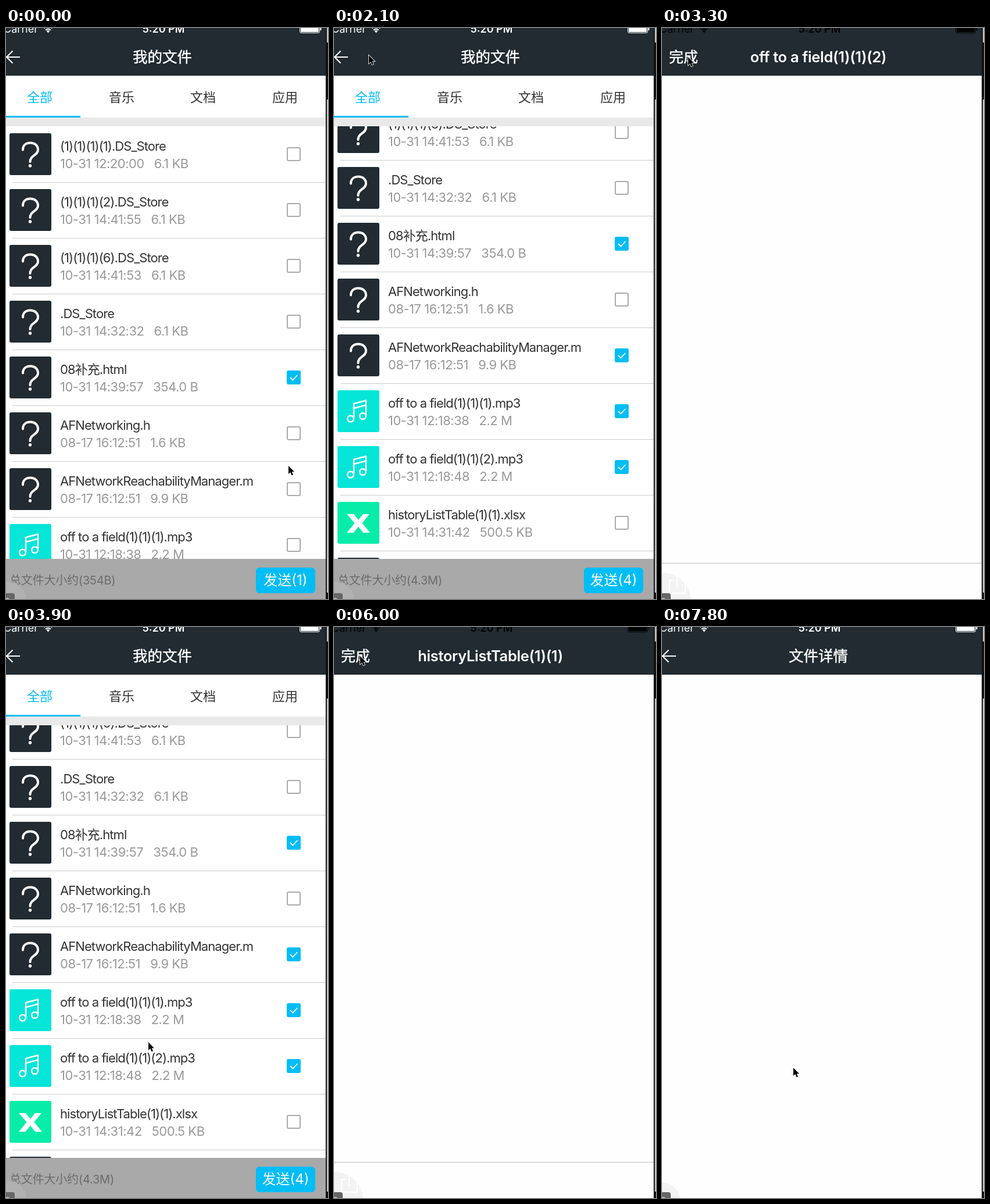
Write an HTML page that moves like this. It is 554 by 982 pixels and loops after 8 s.

```html
<!DOCTYPE html>
<html lang="zh-CN">
<head>
<meta charset="utf-8">
<title>我的文件</title>
<style>
  html, body { margin: 0; width: 100%; height: 100%; overflow: hidden; background: #fefefe; }
  body { position: relative; font-family: Inter, "Noto Sans CJK SC", "Noto Sans CJK", sans-serif; color: #333; }
  div, span, svg { position: absolute; left: 0; top: 0; }
  span { white-space: pre; }
  #stage { width: 554px; height: 982px; overflow: hidden; background: #fefefe; }
  [hidden] { display: none; }
  .mid { transform: translateX(-50%); }

  #bar { width: 550px; height: 82px; background: #212b31; color: #fff; }
  #status { width: 550px; height: 12px; color: #fff; }
  #status.dark { color: #000; }
  #status span { top: -9px; font-size: 18px; line-height: 22px; }
  #status .carrier { left: auto; right: 495px; }
  #status .clock { left: 271px; font-weight: 600; }
  .head { top: 34px; left: 269px; font-size: 25.5px; line-height: 32px; font-weight: 600; letter-spacing: -.013em; }
  .head.cjk, #done { font-weight: 500; letter-spacing: 0; -webkit-text-stroke: .5px #fff; }
  #done { left: 12px; top: 34px; font-size: 25px; line-height: 32px; }
  #back { top: 36px; }

  #list { top: 82px; width: 550px; height: 900px; background: #fff; }
  .tab { top: 22px; font-size: 22px; line-height: 30px; }
  .tab.on { color: #00bdf5; }
  #line { top: 69px; width: 128px; height: 3px; background: #00bdf5; z-index: 1; }
  #strip { top: 72px; width: 550px; height: 15px; background: #e9e9e9; }
  #view { top: 87px; width: 550px; height: 744px; overflow: hidden; }
  .row { width: 550px; height: 96px; }
  .row::after { content: ""; position: absolute; left: 11px; right: 0; top: 96px; height: 1px; background: #ccc; }
  .icon { left: 6px; top: 12px; width: 72px; height: 72px; border-radius: 3px; }
  .name, .info { left: 93px; font-size: 22px; line-height: 30px; }
  .name { top: 19px; letter-spacing: -.042em; }
  .info { top: 49px; letter-spacing: -.022em; color: #999; }
  .box { left: 483px; top: 36px; width: 24px; height: 24px; box-sizing: border-box;
         border: 2px solid #aaa; border-radius: 3px; background: #fff; }
  .box svg { left: -2px; top: -2px; visibility: hidden; }
  .box.on { border-color: #00bdf5; background: #00bdf5; }
  .box.on svg { visibility: visible; }

  #foot { top: 831px; width: 550px; height: 69px; background: #a9a9a9; }
  #total { left: 6px; top: 22px; font-size: 20px; line-height: 30px; color: #6b6b6b; letter-spacing: -.01em; }
  #send { left: 430px; top: 15px; width: 102px; height: 44px; border-radius: 6px; background: #00bdf5;
          color: #fff; font-size: 24px; line-height: 44px; text-align: center; }

  #tool { top: 920px; width: 550px; height: 61px; border-top: 1px solid #b9b9b9; }
  #halo { border-radius: 50%; transform: translate(-50%, -50%); left: 2px; top: 985px; }
  #knob { left: -8px; top: 972px; width: 23px; height: 20px; border-radius: 4px; background: #666; }
  #knob::after { content: ""; position: absolute; left: 7px; top: 8px; width: 7px; height: 7px; border-radius: 50%; background: #bbb; }
  #edge { left: 550px; width: 4px; height: 982px; background: linear-gradient(90deg, #161616 1.5px, #c4c4c4 2px); }
  #edge::before, #edge::after { content: ""; position: absolute; left: 1px; right: 0; background: #111; }
  #edge::before { top: 25px; height: 98px; }
  #edge::after { top: 971px; height: 11px; }
</style>
</head>
<body>
<div id="stage">
  <div id="list">
    <span class="tab mid on" style="left:58px">全部</span>
    <span class="tab mid" style="left:199px">音乐</span>
    <span class="tab mid" style="left:339px">文档</span>
    <span class="tab mid" style="left:480px">应用</span>
    <div id="line"></div>
    <div id="strip"></div>
    <div id="view"><div id="rows"></div></div>
    <div id="foot"><span id="total"></span><div id="send"></div></div>
  </div>
  <div id="tool"></div>
  <div id="halo"></div>
  <svg id="share" width="50" height="982" fill="none" stroke="#fff" stroke-width="2">
    <path d="M20 950H13V972H40V950H33M26 963V942"/>
  </svg>
  <div id="knob"></div>

  <div id="bar">
    <div id="status">
      <span class="carrier">Carrier</span>
      <span class="clock mid">5:20 PM</span>
      <svg width="550" height="12" fill="none" stroke="currentColor">
        <path d="M65.500 0.500Q72.500 -5.500 79.500 0.500M68 3.500Q72.500 0 77 3.500" stroke-width="2"/>
        <path d="M69.500 5L72.500 8.500L75.500 5Q72.500 3 69.500 5Z" fill="currentColor" stroke="none"/>
        <rect x="505.500" y="-8" width="34" height="16.500" rx="2.500"/>
        <rect x="507" y="-6" width="31" height="13" rx="1" fill="currentColor" stroke="none"/>
        <path d="M541.500 -3V4" stroke-width="2"/>
      </svg>
    </div>
    <svg id="back" width="26" height="28" fill="none" stroke="#fff" stroke-width="2">
      <path d="M24 14H1M11.500 3.500L1 14L11.500 24.500"/>
    </svg>
    <span id="done">完成</span>
    <span id="head" class="head mid"></span>
  </div>
  <div id="edge"></div>
  <svg id="cursor" width="16" height="22" viewBox="-2 -2 16 22">
    <path d="M0 0V14L3.200 11L5.500 16.300L8 15.200L5.700 10.200H10Z" stroke="#fff" stroke-width="1.600" paint-order="stroke"/>
  </svg>
</div>
<script>
const $ = id => document.getElementById(id);
const LOOP = 8000, STEP = 300;

const ICONS = {
  ask: ['#212b31', '<path d="M23 28.500C23 20.500 28.500 16.500 36 16.500S49 21 49 28.500C49 38 35.500 38 35.500 49" stroke-width="4" stroke-linecap="round"/><circle cx="35.500" cy="56" r="2.700" fill="#fff" stroke="none"/>'],
  song: ['#05e5d8', '<path d="M28 49V23L49 17.500V44M28 31L49 25.500" stroke-width="2.600" stroke-linejoin="round"/><circle cx="22.500" cy="49" r="5.300" stroke-width="2.600"/><circle cx="43.500" cy="44.500" r="5.300" stroke-width="2.600"/>'],
  sheet: ['#07eca8', '<path d="M16 21H28L36 31L44 21H55L42.500 36.500L56 53H44L36 42.500L27.500 53H16L29.500 36.500Z" fill="#fff" stroke="none"/>']
};

const FILES = [
  ['ask', '(1)(1)(1)(1).DS_Store', '10-31 12:20:00   6.1 KB'],
  ['ask', '(1)(1)(1)(2).DS_Store', '10-31 14:41:55   6.1 KB'],
  ['ask', '(1)(1)(1)(6).DS_Store', '10-31 14:41:53   6.1 KB'],
  ['ask', '.DS_Store', '10-31 14:32:32   6.1 KB'],
  ['ask', '08补充.html', '10-31 14:39:57   354.0 B'],
  ['ask', 'AFNetworking.h', '08-17 16:12:51   1.6 KB'],
  ['ask', 'AFNetworkReachabilityManager.m', '08-17 16:12:51   9.9 KB'],
  ['song', 'off to a field(1)(1)(1).mp3', '10-31 12:18:38   2.2 M'],
  ['song', 'off to a field(1)(1)(2).mp3', '10-31 12:18:48   2.2 M'],
  ['sheet', 'historyListTable(1)(1).xlsx', '10-31 14:31:42   500.5 KB'],
  ['ask', 'LICENSE', '08-17 16:12:52   1.1 KB'],
  ['ask', 'README(1).md', '10-31 14:51:39   14.3 KB'],
  ['ask', '', '']
];

$('rows').innerHTML = FILES.map(([kind, name, info], i) => {
  const [color, art] = ICONS[kind];
  return `<div class="row" style="top:${i * 96}px">
    <svg class="icon" style="background:${color}" fill="none" stroke="#fff">${art}</svg>
    <span class="name">${name}</span><span class="info">${info}</span>
    <div class="box"><svg width="24" height="24" fill="none" stroke="#fff" stroke-width="1.800"><path d="M6 12L10.500 16.500L18.500 8"/></svg></div>
  </div>`;
}).join('');
const boxes = [...document.querySelectorAll('.box')];

// [time, x, y] of the pointer tip
const PATH = [
  [0, 486, 753], [300, 489, 690], [600, 490, 572], [900, 490, 572], [1200, 492, 655],
  [1500, 493, 750], [1800, 310, 740], [2100, 60, 47], [2700, 106, 83], [3000, 60, 60],
  [3300, 45, 50], [3600, 200, 560], [3900, 245, 714], [4200, 246, 655], [5100, 246, 655],
  [5700, 45, 50], [6000, 45, 50], [6600, 214, 741], [7200, 216, 745], [7800, 226, 758]
];
const SCROLL = [[0, 0], [300, 65], [600, 230], [3900, 230], [4200, 340], [4500, 428]];

// time at which each file is ticked, with the total shown from then on
const TICKS = [[0, 4, '354B'], [900, 6, '10K'], [1200, 7, '2.2M'], [1500, 8, '4.3M']];

// [time, page, title, page is settled]
const PAGES = [
  [0, 'list'],
  [2400, 'preview', ''],
  [3000, 'preview', 'off to a field(1)(1)(2)', true],
  [3600, 'list'],
  [4800, 'preview', ''],
  [5100, 'preview', 'historyListTable(1)(1)', true],
  [6300, 'list'],
  [7500, 'detail']
];
const TITLES = { list: '我的文件', detail: '文件详情' };
const HALO = { list: [33, '#b1b1b1'], preview: [48, '#f3f3f3'], detail: [29, '#f3f3f3'] };

const last = (keys, t) => keys.filter(k => k[0] <= t).pop();

function at(keys, t) {
  const a = last(keys, t), b = keys.find(k => k[0] > t) || a;
  const p = a === b ? 0 : (t - a[0]) / (b[0] - a[0]);
  return a.slice(1).map((v, i) => v + (b[i + 1] - v) * p);
}

function draw(t) {
  const [, page, title = TITLES[page], settled = false] = last(PAGES, t);
  const preview = page === 'preview';
  $('list').hidden = page !== 'list';
  $('tool').hidden = !preview;
  $('share').style.display = settled ? '' : 'none';
  $('back').style.display = preview ? 'none' : '';
  $('done').hidden = !settled;
  $('status').className = settled ? 'dark' : '';
  $('head').textContent = title;
  $('head').className = preview ? 'head mid' : 'head mid cjk';

  const [radius, tone] = HALO[page];
  const halo = $('halo').style;
  halo.width = halo.height = radius * 2 + 'px';
  halo.background = tone;

  const ticked = TICKS.filter(k => k[0] <= t);
  boxes.forEach((box, i) => box.classList.toggle('on', ticked.some(k => k[1] === i)));
  $('total').textContent = `总文件大小约(${ticked[ticked.length - 1][2]})`;
  $('send').textContent = `发送(${ticked.length})`;
  $('rows').style.transform = `translateY(${-at(SCROLL, t)[0]}px)`;

  const [x, y] = at(PATH, t);
  $('cursor').style.transform = `translate(${x - 2}px, ${y - 2}px)`;
}

// the picture moves in steps of 300 ms
const start = performance.now();
function tick() {
  const t = (performance.now() - start) % LOOP;
  draw(Math.floor(t / STEP) * STEP);
  requestAnimationFrame(tick);
}
tick();
</script>
</body>
</html>
```
